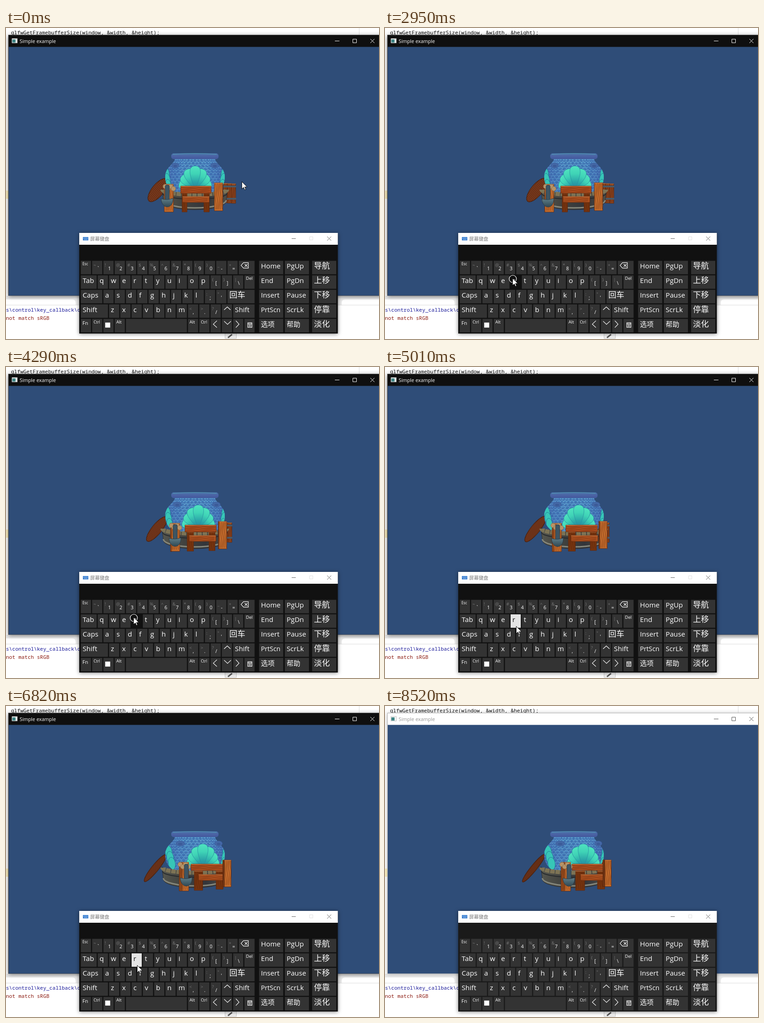
These frames come from a looping animation (820 px wide and 683 px high, 8.62 s). An HTML page with a canvas:

```html
<!DOCTYPE html>
<html lang="zh-CN">
<head>
<meta charset="utf-8">
<style>
html, body { margin: 0; width: 820px; height: 683px; overflow: hidden; background: #fff }
svg, canvas { position: absolute; left: 0; top: 0 }
text { font-family: 'Open Sans', 'Noto Sans CJK SC', sans-serif; white-space: pre }
.code { font: 11.35px 'Noto Sans Mono', 'DejaVu Sans Mono', monospace }
.win { filter: drop-shadow(0 2px 5px rgba(0, 0, 0, .5)) }
.edge { fill: #3a3a3a }
.bar { fill: #0f0f0f }
.title { fill: #fff }
.ctl { stroke: #fff; fill: none }
.panel { fill: #111 }
.idle .win { filter: drop-shadow(0 1px 4px rgba(0, 0, 0, .28)) }
.idle .edge { fill: #b4b4b4 }
.idle .bar { fill: #fff }
.idle .title { fill: #949494 }
.idle .ctl { stroke: #555 }
.idle .panel { fill: #1a1a1a }
.key rect { fill: #333 }
.key text { fill: #fff }
.key .dim { fill: #777 }
.key path { fill: none; stroke: #fff; stroke-width: 1.2 }
.key .solid { fill: #fff; stroke: none }
.hover rect { fill: #e5e5e5 }
.hover text { fill: #111 }
.hover path { stroke: #111 }
.down rect { fill: #111 }
</style>
</head>
<body>
<svg id="ui" width="820" height="683"></svg>
<canvas id="view" width="820" height="683"></canvas>
<script>
const ui = document.getElementById('ui');
const c = document.getElementById('view').getContext('2d');
const LOOP = 8620, STEP = 120;

function el(tag, attrs, parent = ui, text) {
  const e = document.createElementNS('http://www.w3.org/2000/svg', tag);
  for (const k in attrs) e.setAttribute(k, attrs[k]);
  if (text) e.textContent = text;
  return parent.appendChild(e);
}
const box = (x, y, width, height, more, parent) => el('rect', { x, y, width, height, ...more }, parent);
const label = (x, y, size, text, more, parent) => el('text', { x, y, 'font-size': size, ...more }, parent, text);
const line = (d, more, parent) => el('path', { d, ...more }, parent);

// Editor behind the windows
box(0, 588, 820, 21, { fill: '#ebebeb' });
box(-20, 596, 173, 30, { rx: 7, fill: '#fff' });
box(738, 596, 120, 30, { rx: 7, fill: '#fff' });
box(0, 609, 820, 74, { fill: '#fff' });
line('M0 608.5H820', { stroke: '#ddd' });
box(0, 357, 6, 18, { fill: '#fff3c4' });
line('M776.5 0V15', { stroke: '#ddd' });
label(11, 14, 11.35, 'glfwGetFramebufferSize(window, &width, &height);', { class: 'code', fill: '#111' });
label(0, 623, 11.35, 's\\control\\key_callback\\c', { class: 'code', fill: '#1a1a9a' });
label(0, 641, 11.35, 'not match sRGB', { class: 'code', fill: '#8b1a10' });
box(481.5, 660.5, 25, 21, { fill: '#f2f2f2', stroke: '#ccc' });
line('M488 680L497 673', { stroke: '#555', 'stroke-width': 3 });

// Application window
const app = el('g', { class: 'win' });
box(5, 15, 830, 573, { class: 'edge' }, app);
box(6, 16, 814, 26, { class: 'bar' }, app);
box(6, 41.5, 814, 546, { fill: '#2f4d78' }, app);
box(13, 23, 12, 10, { fill: '#f4f4f4', stroke: '#999', 'stroke-width': .6 }, app);
box(14, 25, 7, 7, { fill: '#3f8585' }, app);
label(30, 32.5, 10.8, 'Simple example', { class: 'title' }, app);
line('M723 28.5H733M762.5 24.5h8v8h-8zM801 24l9 9M810 24l-9 9', { class: 'ctl' }, app);

// On-screen keyboard
const board = el('g', { style: 'filter:drop-shadow(0 1px 4px rgba(0,0,0,.5))' });
box(161, 450, 568.5, 221, { class: 'panel' }, board);
box(161, 450, 568.5, 26, { fill: '#fff' }, board);
box(169, 459, 12, 7.5, { fill: '#3a7fd0' }, board);
line('M170.5 461.5H180M172 464.5H178.5', { stroke: '#dcebff', 'stroke-dasharray': '1.5 1' }, board);
label(185, 466.5, 10.5, '屏幕键盘', { fill: '#777' }, board);
line('M628 462.5h9M706 458l9 9M715 458l-9 9', { stroke: '#666' }, board);
line('M667.5 458.5h7v7h-7z', { stroke: '#e2e2e2', fill: 'none' }, board);

const icons = {
  bksp: 'M5 10L10.5 4H21V16H10.5ZM13 7l6 6M19 7l-6 6',
  up: 'M5 12L12 5.5L19 12', down: 'M5 5L12.5 12L20 5',
  left: 'M14 4L6 11.5L14 19', right: 'M6 4L13 11.5L6 19',
  menu: 'M7.5 8.5h9v10h-9zM7.5 11h9M9.5 13.5h5M9.5 16h5',
  win: 'M4 8h11v11h-11z', space: ''
};
const sizes = { Esc: 8.3, Fn: 11, Ctrl: 8.3, Alt: 9.5, Del: 9.5, PrtScn: 14.2, 选项: 15, 帮助: 15 };
const rows = [
  'Esc ~` !1 @2 #3 $4 %5 ^6 &7 *8 (9 )0 _- += bksp=1.5',
  'Tab=1.5 q w e r t y u i o p {[ }] |\\ Del',
  'Caps=2 a s d f g h j k l :; "\' 回车=2.5',
  'Shift=2.5 z x c v b n m <, >. ?/ up Shift=2',
  'Fn Ctrl win Alt space=5.5 Alt Ctrl left down right menu'
];
const side = ['Home PgUp 导航', 'End PgDn 上移', 'Insert Pause 下移', 'PrtScn ScrLk 停靠', '选项 帮助 淡化'];
const UNIT = 24.8;
const keys = [];

function addKey(name, x, y, w) {
  const h = 29.5, g = el('g', { class: 'key' });
  box(x, y, w, h, {}, g);
  keys.push({ name, x, y, w, h, g });
  const size = sizes[name], cjk = /[^\x00-\x7f]/.test(name);
  if (name in icons) {
    line(icons[name], { transform: `translate(${x} ${y})`, class: name == 'win' ? 'solid' : '' }, g);
  } else if (size < 12) {
    label(x + 3.5, y + (name == 'Fn' ? 13 : 10), size, name, {}, g);
  } else if (name.length == 2 && !cjk) {
    label(x + 3, y + 12.5, 9.5, name[0], { class: 'dim' }, g);
    label(x + 10.5, y + 20.5, 10.5, name[1], {}, g);
  } else {
    label(x + 4, y + 16.7, size || (cjk ? 17.5 : 15.2), name, {}, g);
  }
}
rows.forEach((row, r) => {
  const y = 511.3 + r * 31.9;
  let x = 164.5;
  for (const item of row.split(' ')) {
    const [, name, units = 1] = item.match(/^(.+?)(?:=([\d.]+))?$/);
    addKey(name, x, y, units * UNIT - 2.4);
    x += units * UNIT;
  }
  side[r].split(' ').forEach((name, i) => addKey(name, [556.5, 613, 673][i], y, 53));
});

// Each row: first change, last change, then turn and pointer reached at the end
const moves = [
  [120, 960, 0, 280, 549],
  [1210, 1330, .05, 280, 549],
  [1580, 1700, .06, 280, 549],
  [2950, 3190, .12, 280, 549],
  [3690, 4530, .425, 280, 549],
  [4650, 5010, .5, 288, 569],
  [5250, 5970, .7, 288, 569],
  [6340, 6820, .84, 288, 569],
  [7070, 7910, 1, 656, 655],
  [8030, 8150, 1, 742, 700]
];
function stateAt(t) {
  let s = [0, 518, 337];
  for (const [from, to, ...end] of moves) {
    if (t < from) break;
    const done = Math.min(Math.floor((t - from) / STEP), (to - from) / STEP) + 1;
    const f = done / ((to - from) / STEP + 1);
    s = s.map((v, i) => v + (end[i] - v) * f);
  }
  return s;
}

function shape(fill, draw, stroke, width = 1) {
  c.beginPath();
  draw();
  if (fill) { c.fillStyle = fill; c.fill(); }
  if (stroke) { c.strokeStyle = stroke; c.lineWidth = width; c.stroke(); }
}
const oval = (x, y, rx, ry, rot = 0, a = 0, b = 7) => c.ellipse(x, y, rx, ry, rot, a, Math.min(b, 2 * Math.PI));
function fade(x0, y0, x1, y1, ...cols) {
  const g = c.createLinearGradient(x0, y0, x1, y1);
  cols.forEach((col, i) => g.addColorStop(i / (cols.length - 1), col));
  return g;
}

function plank(x, y, w, h, col) {
  const wide = w > h, len = wide ? w : h, across = wide ? h : w;
  shape(col, () => c.rect(x, y, w, h), '#5e260e', .8);
  shape(0, () => {
    for (let k = 3; k < across - 1; k += 3.6)
      for (let s = 1; s < len - 1; s += 3) {
        const o = k + Math.sin(s * .16 + k * 2) * 1.1;
        const p = wide ? [x + s, y + o] : [x + o, y + s];
        s == 1 ? c.moveTo(...p) : c.lineTo(...p);
      }
  }, 'rgba(82,28,8,.55)', .9);
  shape(0, () => { c.moveTo(x, y + .7); c.lineTo(x + w, y + .7); }, '#d0824a');
}

function bodyPath() {
  c.moveTo(372, 286);
  c.bezierCurveTo(370, 300, 350, 305, 350, 327);
  c.bezierCurveTo(350, 345, 360, 356, 374, 364);
  c.lineTo(456, 364);
  c.bezierCurveTo(470, 356, 481, 345, 481, 327);
  c.bezierCurveTo(481, 305, 461, 300, 459, 286);
  c.closePath();
}

function petal(x, y, len, half, rot) {
  c.save();
  c.translate(x, y);
  c.rotate(rot);
  shape(fade(0, -len, 0, 0, '#4fe3bf', '#3fd3b6', '#2ba5a8', '#27809c'), () => {
    c.moveTo(0, 0);
    c.bezierCurveTo(-half * .4, -len * .3, -half * 1.5, -len, 0, -len);
    c.bezierCurveTo(half * 1.5, -len, half * .4, -len * .3, 0, 0);
  }, '#2a8ea2', .8);
  c.restore();
}

function drawPot(a) {
  const mix = (p, q) => p + (q - p) * a;

  // Lid leaning behind
  c.save();
  c.translate(mix(334, 327), 356);
  c.rotate(-.89);
  const lr = mix(31, 39), lh = mix(13, 6.5);
  shape('#7b3a1d', () => oval(0, 0, lr, lh), '#4f2512', 1.5);
  shape(0, () => {
    for (let k = -.75; k < .8; k += .25) {
      const half = lr * Math.sqrt(1 - k * k);
      c.moveTo(-half, k * lh);
      c.lineTo(half, k * lh);
    }
  }, 'rgba(62,26,12,.75)', .9);
  c.restore();

  // Barrel on the right
  const bx = mix(478, 460);
  for (let i = 0; i < 3; i++) plank(bx + i * mix(9, 7), 341 + i * .5, mix(9, 7), 43, '#85401c');
  shape('#495866', () => { c.rect(bx, 346, mix(28, 22), 4); c.rect(bx, 373, mix(28, 22), 4); });

  // Pot body with scales turning around it
  shape('#3f6fae', bodyPath);
  c.save();
  c.beginPath();
  bodyPath();
  c.clip();
  const gap = .16;
  for (let r = 0; r < 13; r++) {
    const y = 291 + r * 6, R = 45 + 21 * Math.min(1, r / 5);
    for (let k = -12; k <= 10; k++) {
      const p = (k + r % 2 / 2) * gap + a * .3;
      if (Math.abs(p) > 1.55) continue;
      shape((k + r) & 1 ? '#4a86bf' : '#4179b6',
        () => oval(415.5 + R * Math.sin(p), y, R * gap * .46 * Math.cos(p), 4.2, 0, Math.PI), '#6db2d6');
    }
  }
  shape(fade(350, 0, 481, 0, 'rgba(52,66,150,.5)', 'rgba(60,110,190,.05)', 'rgba(60,110,190,.05)', 'rgba(52,66,150,.5)'),
    () => c.rect(345, 284, 140, 82));
  // Side shells
  for (let i = 0; i < 3; i++) {
    shape('#37c6b7', () => oval(mix(353, 358) + i * mix(2, 4), 320 + i * 13, mix(6, 8), 14, -.15), '#237f9a');
    shape('#37c6b7', () => oval(mix(479, 483) - i * 2, 320 + i * 13, 6, 14, .15), '#237f9a');
  }
  c.restore();
  for (const [x, w] of [[mix(372, 385), mix(8, 10)], [mix(459, 469), mix(9, 8)]]) {
    shape('#4468a6', () => oval(x, 302, w, 5.5), '#3c5c9c');
    shape('#3b5a98', () => oval(x, 303, w * .5, 2.5));
  }
  shape(fade(0, 275, 0, 289, '#4a78ab', '#4b62a4', '#42559a'), () => c.roundRect(363.5, 275.5, 103.5, 12, 5), '#4560a0', .8);
  shape(0, () => { c.moveTo(367, 277.5); c.quadraticCurveTo(415, 273.5, 463, 277.5); }, '#56a0b8');

  // Tub
  shape(fade(343, 0, 487, 0, '#55564e', '#41423f', '#33353a', '#504f4a'), () => {
    oval(415, 353, 72, 10, 0, 0, Math.PI);
    c.lineTo(346, 381);
    c.ellipse(415, 381, 69, 18, 0, Math.PI, 0, true);
    c.closePath();
  }, '#302f2c');
  shape(0, () => oval(415, 378, 69, 17, 0, 0, Math.PI), '#85867a', 3);
  shape(0, () => oval(415, 363, 71, 13, 0, 0, Math.PI), '#272a2d', 2);
  c.setLineDash([10, 1.5]);
  shape(0, () => oval(415, 355, 71, 11, 0, 0, Math.PI), '#7d7355', 9);
  c.setLineDash([]);

  // Front shell
  const sx = mix(416, 436);
  [3, 2, 1, 0].forEach(i => {
    const len = [52, 48, 42, 38][i], rot = [0, .37, .74, 1.14][i];
    petal(sx, 355, len, 15, -rot);
    if (i) petal(sx, 355, len, 15, rot);
  });

  // Bench
  plank(mix(387, 419), 362, mix(11, 20), mix(42, 43), '#75340f');
  plank(mix(435, 467), 362, mix(12, 16), mix(42, 40), '#75340f');
  plank(mix(388, 430), 370, 59, 13, '#ab501f');
  plank(mix(384, 411), 347, mix(67, 72), mix(16, 14), '#ab4c1d');

  // Posts
  const e = a + .3 * a * (1 - a), rx = 458 + 21 * e;
  plank(rx, 340 - 2 * e, 18.5, 61.5 - 3 * e, '#c26b2c');
  shape('rgba(70,25,8,.65)', () => c.rect(rx, 340 - 2 * e, 5 * a, 61.5 - 3 * e));
  const px = mix(348, 387);
  plank(px, 343, mix(20, 21), mix(61, 63.5), '#c26b2c');
  shape('rgba(90,35,10,.45)', () => c.rect(px, 343, 9 * a, 63));
  for (let i = 0; i < 4; i++)
    shape('#b79468', () => oval(px + 2 + i * 6, 348 + i % 2 * 5, 5, 5), '#8a6c4c', .8);

  // Scoop hanging on the left post
  const tx = mix(354, 404), ty = mix(0, 3);
  shape('#3d5563', () => c.roundRect(tx - 4, 345 + ty, 9, 33, 3), '#2b3d4a');
  shape(fade(0, 373 + ty, 0, 393 + ty, '#66828a', '#496570', '#304853'), () => {
    c.moveTo(tx - 13, 375 + ty);
    c.quadraticCurveTo(tx, 379 + ty, tx + 13, 374 + ty);
    c.bezierCurveTo(tx + 14, 399 + ty, tx - 12, 399 + ty, tx - 13, 375 + ty);
  }, '#2b3d4a');
}

const arrow = new Path2D('M0 0V16L3.7 12.4L6.3 18L8.6 17L6.2 11.6H11.4Z');
function drawPointer(x, y, ring) {
  if (ring) shape(0, () => oval(x + 1, y + 2, 8, 8), '#fff', 1.2);
  c.save();
  c.translate(x + .5, y + .5);
  c.fillStyle = '#fff';
  c.fill(arrow);
  c.strokeStyle = '#000';
  c.lineWidth = .9;
  c.stroke(arrow);
  c.restore();
}

function frame(now) {
  const t = now % LOOP, [turn, x, y] = stateAt(t);
  const idle = t >= 8520;
  const ring = t >= 1580 && t < 4650 || t >= 5250 && t < 6580;
  ui.setAttribute('class', idle ? 'idle' : '');
  for (const k of keys) {
    const over = x >= k.x && x <= k.x + k.w && y >= k.y && y <= k.y + k.h;
    k.g.setAttribute('class', 'key' + (over ? ring && t >= 2950 ? ' down' : ' hover' : ''));
  }
  c.clearRect(0, 0, 820, 683);
  drawPot(turn);
  if (!idle) drawPointer(x, y, ring);
  requestAnimationFrame(frame);
}
requestAnimationFrame(frame);
</script>
</body>
</html>
```
